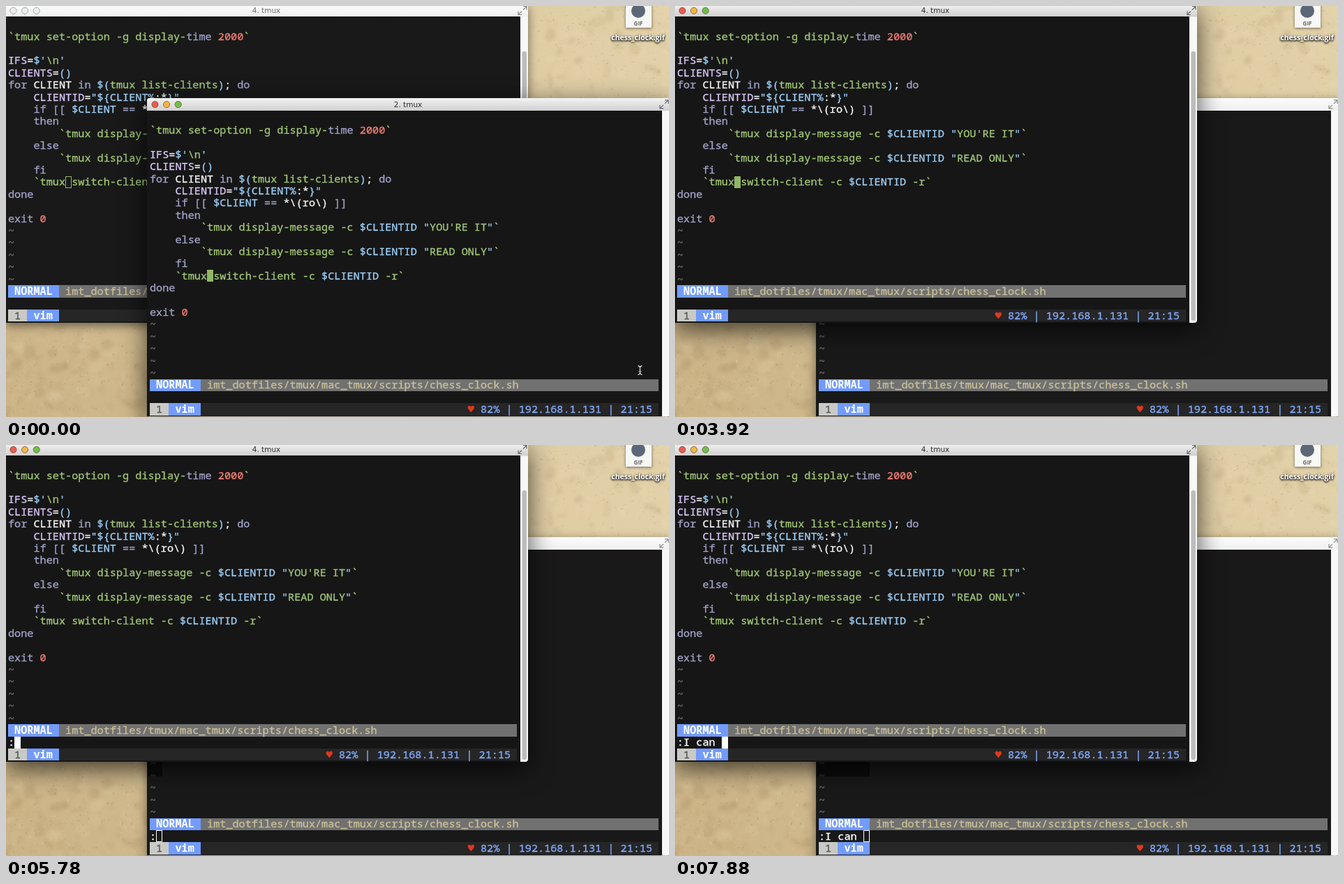
Animation, 950 px wide and 589 px high, one loop 8 s. Source, as an HTML page with a canvas:

```html
<!DOCTYPE html>
<html lang="en">
<head>
<meta charset="utf-8">
<title>chess clock</title>
<style>
html, body { margin: 0; width: 100%; height: 100%; overflow: hidden; background: #d8c296; }
canvas { display: block; }
</style>
</head>
<body>
<canvas id="stage" width="950" height="589"></canvas>
<script>
const W = 950, H = 589, LOOP = 8000;
const ctx = document.getElementById('stage').getContext('2d');

// Terminal grid
const CW = 9.115, RH = 17.4, LEFT = 3, TOP = 17.4;
const MONO = '15.19px "Noto Sans Mono", "DejaVu Sans Mono", monospace';
const COLORS = {
  g: '#9fc573', k: '#a0a2c8', r: '#f07c72', b: '#9acdf5',
  p: '#d8c6f8', w: '#f6f6f6', d: '#6a6a6a'
};

// Each run starts with its colour key
const CODE = {
  1: ['g`tmux set-option -g display-', 'ktime', 'r 2000', 'g`'],
  3: ['pIFS', 'w=', "b$'", 'g\\n', "b'"],
  4: ['pCLIENTS', 'w=', 'b()'],
  5: ['kfor ', 'wCLIENT ', 'kin ', 'b$(', 'gtmux list-clients', 'b)', 'w; ', 'kdo'],
  6: ['p    CLIENTID', 'w=', 'b"${CLIENT%', 'w:*', 'b}"'],
  7: ['k    if [[ ', 'b$CLIENT ', 'k== ', 'w*\\(ro\\) ', 'k]]'],
  8: ['k    then'],
  9: ['g        `tmux display-message -c ', 'b$CLIENTID "', "gYOU'RE IT", 'b"', 'g`'],
  10: ['k    else'],
  11: ['g        `tmux display-message -c ', 'b$CLIENTID "', 'gREAD ONLY', 'b"', 'g`'],
  12: ['k    fi'],
  13: ['g    `tmux switch-client -c ', 'b$CLIENTID ', 'g-r`'],
  14: ['kdone'],
  16: ['kexit ', 'r0']
};
for (let row = 17; row < 22; row++) CODE[row] = ['d~'];

// [time, column, row, colour] of the editor cursor
const MOVES = [
  [0, 9, 13, '#8fb766'], [4400, 3, 14, '#fff'], [4580, 0, 15, '#fff'], [5030, 5, 16, '#fff']
];
const TYPED = [
  [0, ''], [5780, ':'], [7130, ':I'], [7280, ':I '], [7580, ':I c'], [7730, ':I can'], [7880, ':I can ']
];
const POINTER = [[0, 908.5, 522], [150, 904.5, 505.5], [330, 919.5, 469], [480]];

const latest = (steps, t) => steps.filter(s => s[0] <= t).pop();

// Filled box with its edges on whole stage pixels
function rect(color, x, y, w, h) {
  const { e, f } = ctx.getTransform();
  const left = Math.round(x + e), top = Math.round(y + f);
  ctx.fillStyle = color;
  ctx.fillRect(left - e, top - f, Math.round(x + w + e) - left, Math.round(y + h + f) - top);
}

function cells(color, col, row, n) {
  rect(color, LEFT + col * CW, TOP + row * RH, n * CW, RH);
}

function print(text, color, col, row, bold) {
  ctx.font = (bold ? 'bold ' : '') + MONO;
  ctx.textAlign = 'left';
  ctx.fillStyle = ctx.strokeStyle = color;
  ctx.lineWidth = .35;
  [...text].forEach((ch, i) => {
    if (ch === ' ') return;
    const x = LEFT + (col + i) * CW, y = TOP + row * RH + 13.8;
    ctx.fillText(ch, x, y);
    if (!bold) ctx.strokeText(ch, x, y);
  });
}

function label(text, font, color, x, y) {
  ctx.font = font;
  ctx.textAlign = 'center';
  ctx.fillStyle = color;
  ctx.fillText(text, x, y);
}

function drawCursor([col, row, color, glyph], active, bg) {
  cells(color, col, row, 1);
  if (!active) rect(bg, LEFT + col * CW + 1, TOP + row * RH + 1, CW - 2, RH - 2);
  if (glyph) print(glyph, active ? '#111' : color, col, row);
}

function terminal(t, active, bg) {
  for (const row in CODE) {
    let col = 0;
    for (const run of CODE[row]) {
      print(run.slice(1), COLORS[run[0]], col, +row);
      col += run.length - 1;
    }
  }

  cells('#717171', 0, 22, 80);
  cells('#729bfc', 0, 22, 8);
  print('NORMAL', '#fff', 1, 22, true);
  print('imt_dotfiles/tmux/mac_tmux/scripts/chess_clock.sh', '#c9c096', 9, 22);

  cells('#262626', 0, 24, 80);
  cells('#c9c9c5', 0, 24, 3);
  cells('#729bfc', 3, 24, 5);
  print('1', '#555', 1, 24);
  print('vim', '#fff', 4, 24, true);
  print('♥', '#e0391f', 50, 24);
  print('82% | 192.168.1.131 | 21:15', '#82abff', 52, 24);

  const cmd = latest(TYPED, t)[1];
  print(cmd, '#fff', 0, 23);
  const [, col, row, color] = latest(MOVES, t);
  const under = { 14: 'e', 16: '0' }[row];
  drawCursor(cmd ? [cmd.length, 23, '#fff'] : [col, row, color, under], active, bg);
}

// Arrow of the full-screen button, pointing up right (s = 1) or down left (s = -1)
function arrow(s) {
  const x = 740 + 6 * s, y = 6.5 - 6 * s;
  ctx.beginPath();
  ctx.moveTo(x - 5 * s, y);
  ctx.lineTo(x, y);
  ctx.lineTo(x, y + 5 * s);
  ctx.moveTo(x, y);
  ctx.lineTo(x - 5 * s, y + 5 * s);
  ctx.stroke();
}

function titleBar(title, active) {
  const grad = ctx.createLinearGradient(0, -2, 0, 16);
  grad.addColorStop(0, active ? '#f2f2f2' : '#fafbfa');
  grad.addColorStop(1, active ? '#cfcfcf' : '#eff1f0');
  ctx.fillStyle = grad;
  ctx.beginPath();
  ctx.roundRect(-1, -2.4, 749, 18, [4, 4, 0, 0]);
  ctx.fill();

  ['#ee5b50', '#f3b643', '#70bf4b'].forEach((color, i) => {
    ctx.beginPath();
    ctx.arc(10.5 + i * 16.6, 6.7, 4.6, 0, 7);
    ctx.fillStyle = active ? color : '#eceeed';
    ctx.fill();
    ctx.strokeStyle = active ? 'rgba(70,40,20,.55)' : '#a2a4a3';
    ctx.lineWidth = 1;
    ctx.stroke();
  });
  label(title, '10.5px "DejaVu Sans", sans-serif', active ? '#2c2c2c' : '#6c6c6c', 373, 10.4);

  ctx.strokeStyle = active ? '#6a6a6a' : '#8c8c8c';
  ctx.lineWidth = 1.2;
  arrow(1);
  arrow(-1);
}

function win(x, y, title, active, bar, t) {
  const bg = active ? '#161616' : '#191919';
  ctx.save();
  ctx.translate(x, y);
  ctx.save();
  ctx.shadowColor = active ? 'rgba(0,0,0,.7)' : 'rgba(0,0,0,.5)';
  ctx.shadowBlur = active ? 36 : 14;
  ctx.shadowOffsetY = active ? 10 : 4;
  ctx.fillStyle = '#f8f8f8';
  ctx.beginPath();
  ctx.roundRect(-1, -2.4, 749, 456.4, 4);
  ctx.fill();
  ctx.restore();

  titleBar(title, active);
  rect(bg, -1, 15.4, 737.6, 438.6);
  if (bar) {
    ctx.fillStyle = '#bcbcbc';
    ctx.beginPath();
    ctx.roundRect(739.5, 65, 6.5, 386, 3);
    ctx.fill();
  }
  terminal(t, active, bg);
  ctx.restore();
}

// Parchment desktop, painted once with seeded blotches and fibres
function makePaper() {
  const paper = document.createElement('canvas');
  paper.width = W;
  paper.height = H;
  const p = paper.getContext('2d');
  let seed = 7;
  const rnd = () => (seed = seed * 16807 % 2147483647) / 2147483647;
  const grad = p.createLinearGradient(0, H, W, 0);
  grad.addColorStop(0, '#cbb386');
  grad.addColorStop(1, '#e3d2aa');
  p.fillStyle = grad;
  p.fillRect(0, 0, W, H);
  const blot = (n, size, alpha) => {
    for (let i = 0; i < n; i++) {
      p.fillStyle = `rgba(${rnd() < .5 ? '125,95,50' : '250,238,205'},${alpha * rnd()})`;
      p.beginPath();
      p.ellipse(rnd() * W, rnd() * H, size * rnd(), size * .6 * rnd(), rnd() * 3, 0, 7);
      p.fill();
    }
  };
  p.filter = 'blur(2px)';
  blot(2500, 14, .13);
  p.filter = 'none';
  blot(20000, 2, .2);
  return paper;
}
const paper = makePaper();

function desktop() {
  ctx.drawImage(paper, 0, 0);
  ctx.save();
  ctx.shadowColor = 'rgba(0,0,0,.5)';
  ctx.shadowBlur = 4;
  ctx.shadowOffsetY = 1;
  rect('#f7f7f5', 888, -8, 37, 39);
  ctx.restore();
  ctx.fillStyle = '#5c6878';
  ctx.beginPath();
  ctx.arc(906, 7, 10, 0, 7);
  ctx.fill();
  label('GIF', 'bold 8px "Open Sans", sans-serif', '#686868', 906, 28);
  ctx.save();
  ctx.shadowColor = '#000';
  ctx.shadowBlur = 3;
  ctx.shadowOffsetY = 1;
  for (let i = 0; i < 2; i++)
    label('chess_clock.gif', 'bold 10.5px "Open Sans", sans-serif', '#fff', 905.5, 49);
  ctx.restore();
}

function pointer(x, y) {
  ctx.strokeStyle = '#d8d8d8';
  ctx.lineWidth = 1.2;
  ctx.beginPath();
  for (const s of [-1, 1]) {
    ctx.moveTo(x - 3, y + s * 6.3);
    ctx.quadraticCurveTo(x, y + s * 6, x, y + s * 3.5);
    ctx.quadraticCurveTo(x, y + s * 6, x + 3, y + s * 6.3);
  }
  ctx.moveTo(x, y - 5);
  ctx.lineTo(x, y + 5);
  ctx.moveTo(x - 2, y + 2);
  ctx.lineTo(x + 2, y + 2);
  ctx.stroke();
}

function draw(t) {
  const swapped = t >= 3920;
  const first = () => win(0, 0, '4. tmux', swapped, true, t);
  const second = () => win(203, 134.4, '2. tmux', !swapped, false, t);
  desktop();
  if (t < 3770) {
    first();
    second();
  } else {
    second();
    const typed = latest(TYPED, t)[1].length;
    // Deeper shade below the upper window while typing
    if (typed) rect('rgba(0,0,0,.5)', 203, 454, 3 + (typed + 1) * CW, 21);
    first();
  }
  const [, x, y] = latest(POINTER, t);
  if (x) pointer(x, y);
}

function frame() {
  draw(performance.now() % LOOP);
  requestAnimationFrame(frame);
}
frame();
</script>
</body>
</html>
```
